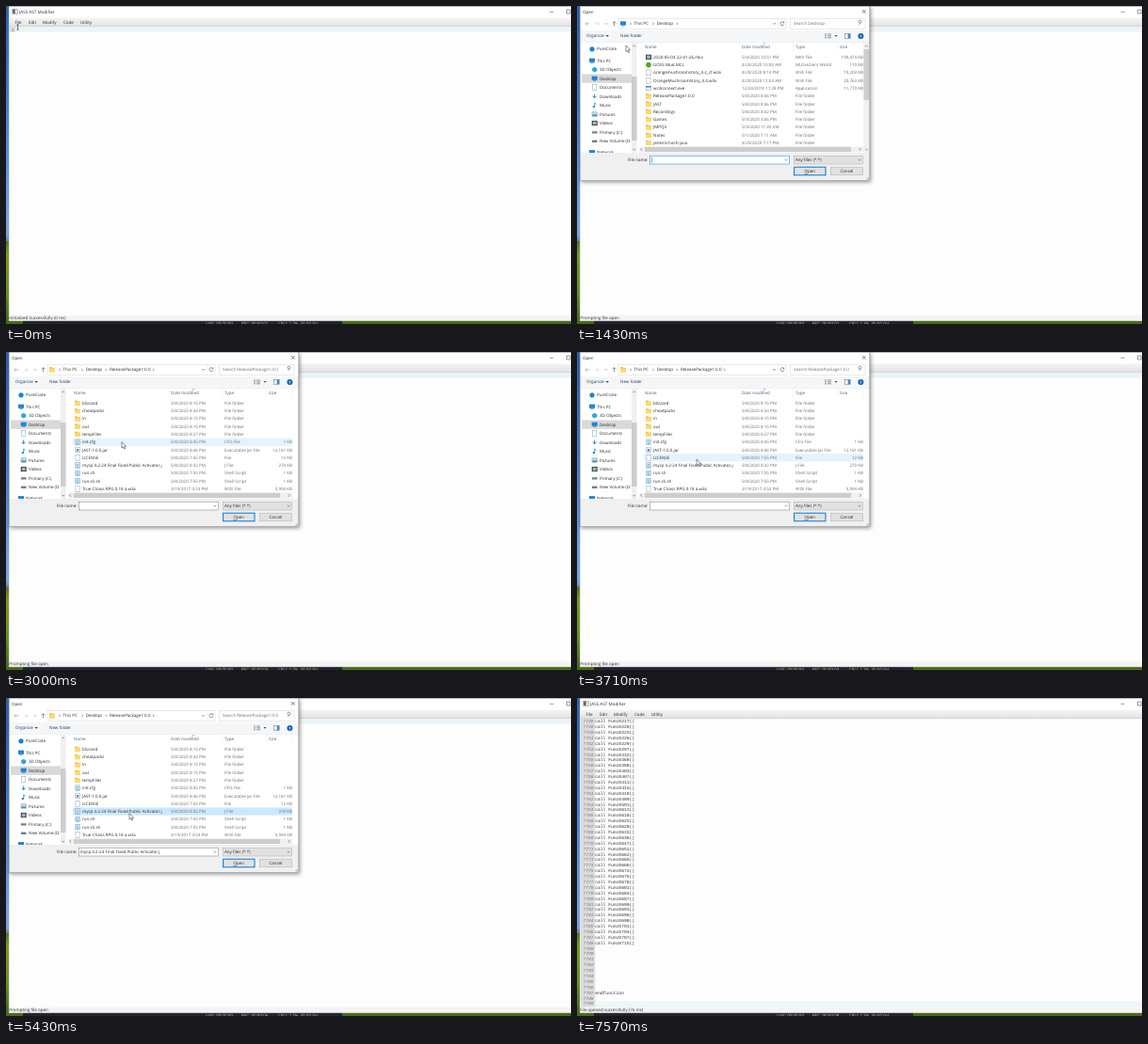
An HTML page that plays this animation: 600x338 px, repeating every 8 s.

```html
<!DOCTYPE html>
<html lang="en">
<head>
<meta charset="utf-8">
<title>JASS AST Modifier</title>
<style>
html, body { margin: 0; width: 100%; height: 100%; overflow: hidden; background: #fff; }
svg { display: block; width: 100vw; height: 100vh; }
text { font: 4.5px "Open Sans", "Noto Sans", sans-serif; fill: #2a2a2a; white-space: pre; text-rendering: geometricPrecision; }
.dim { fill: #6d6d6d; }
.head { fill: #4c607a; }
.tool { fill: #1e395b; }
.obs { fill: #c8c8c8; }
.end { text-anchor: middle; }
.right { text-anchor: end; }
.code { font: 4.67px "Liberation Mono", monospace; fill: #333; }
.num { font: italic 4.67px "Liberation Mono", monospace; fill: #777; }
</style>
</head>
<body>
<svg id="stage" viewBox="0 0 600 338" preserveAspectRatio="none"></svg>
<script>
const LOOP = 8000, STEP = 1000 / 7;
const DIALOG = 1000, FOLDER = 2570, PICK = 4570, CLOSE = 5860, LOADED = 6290;
const ROW0 = 54.3, ROW = 8.28;

const rect = (x, y, w, h, fill, more = '') =>
  `<rect x="${x}" y="${y}" width="${w}" height="${h}" fill="${fill}" ${more}/>`;
const box = (x, y, w, h, fill, line, id = '', width = .5) =>
  rect(x, y, w, h, fill, `stroke="${line}" stroke-width="${width}" ${id && `id="${id}"`}`);
const text = (x, mid, s, cls = '', id = '') =>
  `<text x="${x}" y="${mid + 1.6}" class="${cls}" ${id && `id="${id}"`}>${s}</text>`;
const line = (d, color = '#555', w = .6) =>
  `<path d="${d}" fill="none" stroke="${color}" stroke-width="${w}"/>`;
const fill = (d, color) => `<path d="${d}" fill="${color}"/>`;
const disc = (x, y, r, color) => `<circle cx="${x}" cy="${y}" r="${r}" fill="${color}"/>`;
const group = (id, s) => `<g id="${id}">${s}</g>`;
const chevron = (x, y, dx, dy, color) => dx
  ? line(`M${x - dx / 2} ${y - 1.3}l${dx} 1.3l${-dx} 1.3`, color)
  : line(`M${x - 1.4} ${y - dy / 2}l1.4 ${dy}l1.4 ${-dy}`, color);

// Icons, centred on x, y
const icons = {
  folder: (x, y) => fill(`M${x - 3} ${y - 2.7}h2.4l.7 .8h2.9v4.6h-6z`, '#f0c14b') +
    rect(x - 3, y - 1.2, 6, 3.7, '#ffd971'),
  page: (x, y) => box(x - 2.1, y - 2.9, 4.2, 5.8, '#fff', '#9a9a9a'),
  film: (x, y) => rect(x - 3, y - 2.6, 6, 5.2, '#3b4148') + rect(x - 1.9, y - 1.7, 3.8, 3.4, '#9fb4bd'),
  green: (x, y) => disc(x, y, 2.8, '#58a51f'),
  app: (x, y) => box(x - 2.8, y - 2.3, 5.6, 4.6, '#fff', '#7890a5') + rect(x - 2.8, y - 2.3, 5.6, 1.4, '#2d86d8'),
  note: (x, y) => box(x - 2.2, y - 2.8, 4.4, 5.6, '#d9edf7', '#6c9cb5') +
    line(`M${x - 1.4} ${y - 1}h2.8m-2.8 1.4h2.8m-2.8 1.4h2.8`, '#4c91bb', .5),
  jar: (x, y) => box(x - 2.2, y - 2.8, 4.4, 5.6, '#fff', '#8a9aa5') + rect(x - 1.3, y - 1, 2.6, 2.6, '#6b8fae'),
  screen: (x, y) => rect(x - 3, y - 2.4, 6, 4.2, '#1c86d6') + rect(x - 1.6, y + 2, 3.2, .7, '#4a7ca3'),
  cloud: (x, y) => disc(x, y, 2.6, '#1484d6'),
  cube: (x, y) => fill(`M${x} ${y - 2.7}l2.6 1.4v2.8l-2.6 1.4l-2.6 -1.4v-2.8z`, '#35a9c9'),
  down: (x, y) => line(`M${x} ${y - 2.5}v4m-2 -1.8l2 2l2 -2`, '#1c7fd0', 1),
  music: (x, y) => line(`M${x} ${y + 1.6}v-4l1.8 1.2`, '#1c7fd0', .8) + disc(x - .9, y + 1.7, 1.1, '#1c7fd0'),
  picture: (x, y) => box(x - 2.7, y - 2.2, 5.4, 4.4, '#b7def4', '#8396a5') + rect(x - 2.3, y + .4, 4.6, 1.5, '#4a8f86'),
  drive: (x, y) => rect(x - 2.8, y - .8, 5.6, 2.3, '#777f86') + rect(x - 2.2, y - 1.3, 4.4, .7, '#b9bec2')
};

const desktop = [
  ['film', '2020-05-04 22-41-26.mkv', '5/4/2020 10:51 PM', 'MKV File', '199,474 KB'],
  ['green', 'UOSS Mud.MCL', '4/20/2020 10:00 AM', 'MUSHclient World', '110 KB'],
  ['page', 'orangemushroomstory_4.2_cf.w3x', '4/20/2020 8:14 PM', 'W3X File', '19,203 KB'],
  ['page', 'OrangeMushroomStory_4.4.w3x', '4/20/2020 12:04 AM', 'W3X File', '20,763 KB'],
  ['app', 'wc3connect.exe', '12/24/2019 11:28 PM', 'Application', '11,770 KB'],
  ...[['ReleasePackage1.0.0', '5/8/2020 8:46 PM'], ['JAST', '5/8/2020 8:46 PM'],
    ['Recordings', '5/8/2020 8:42 PM'], ['Games', '5/3/2020 3:06 PM'], ['JMPQ3', '5/3/2020 11:35 AM'],
    ['Notes', '5/1/2020 7:11 AM'], ['jenkins-hash-java', '4/25/2020 7:17 PM']
  ].map(([name, date]) => ['folder', name, date, 'File folder', ''])
];
const picked = 'mycp 4.2-24 Final Fixed Public Activator.j';
const release = [
  ['folder', 'blizzard', '8:15', 'File folder', ''],
  ['folder', 'cheatpacks', '8:34', 'File folder', ''],
  ['folder', 'in', '8:15', 'File folder', ''],
  ['folder', 'out', '8:15', 'File folder', ''],
  ['folder', 'tempFiles', '8:27', 'File folder', ''],
  ['note', 'init.cfg', '8:45', 'CFG File', '1 KB'],
  ['jar', 'JAST-1.0.0.jar', '8:46', 'Executable Jar File', '12,161 KB'],
  ['page', 'LICENSE', '7:55', 'File', '12 KB'],
  ['note', picked, '8:32', 'J File', '270 KB'],
  ['note', 'run.sh', '7:55', 'Shell Script', '1 KB'],
  ['note', 'run-cli.sh', '7:55', 'Shell Script', '1 KB']
].map(([icon, name, time, ...rest]) => [icon, name, `5/8/2020 ${time} PM`, ...rest]);
release.push(['page', 'True Chaos RPG 0.18 a.w3x', '3/19/2017 3:53 PM', 'W3X File', '5,994 KB']);

const fileRows = list => list.map(([icon, name, date, type, size], i) => {
  const y = ROW0 + i * ROW;
  return icons[icon](76, y) + text(81, y, name) + text(175, y, date, 'dim') +
    text(232, y, type, 'dim') + text(304, y, size, 'dim right');
}).join('');

function backdrop() {
  return rect(0, 0, 600, 338, 'url(#sky)') + rect(0, 334, 600, 4, '#4a6a1b') +
    rect(0, 250, 3, 88, 'url(#grass)') + rect(18, 334, 339, 4, '#23262c') +
    text(212, 337.6, 'LIVE: 00:00:00', 'obs') + text(250, 337.6, '', 'obs', 'rec') +
    text(289, 337.6, 'CPU: 2.2%, 30.00 fps', 'obs');
}

function mainWindow() {
  const menus = [[9.5, 'File'], [24, 'Edit'], [39, 'Modify'], [61, 'Code'], [79, 'Utility']];
  return rect(3, 0, 597, 334.5, '#fdfdfe') + rect(3, 0, 597, 12.5, '#fff') +
    rect(3, 0, 597, .6, '#8a8f98') + rect(2.8, 0, .4, 334.5, '#7c8794') +
    box(6.8, 3.2, 5.4, 5.2, '#e4e7ea', '#777') + rect(7.3, 3.7, 2.2, 4.2, '#555') +
    `<text x="14" y="7.9" style="font-size:4.6px">JASS AST Modifier</text>` +
    line('M577.5 6.3h4') + line('M595.5 4h3.6v4h-3.6z') +
    rect(3, 12.5, 597, 9.5, 'url(#bar)') + rect(3, 21.6, 597, .5, '#c4c4c4') +
    menus.map(([x, s]) => text(x, 17.1, s)).join('') +
    group('blank', rect(3, 22, 597, 5.7, '#edf4f7') + rect(3, 22, 7, 5.7, '#ddd') + text(6, 25, '1', 'num')) +
    group('code', codePage()) +
    rect(3, 328.6, 597, 5.9, '#f4f4f4') + text(3.3, 331.4, '', '', 'status');
}

function codePage() {
  const calls = ('217 220 223 226 229 297 332 368 388 403 407 411 415 419 489 591 613 618 623 628 633 ' +
    '636 647 651 662 665 668 672 675 678 681 684 687 690 693 696 698 701 704 707 715').split(' ');
  let s = rect(3, 322, 597, 6.6, '#edf6f8') + rect(4, 22, 15.2, 306.6, '#dcdcdc');
  for (let i = 0; i < 52; i++) {
    const y = 24.6 + i * 5.888;
    const body = calls[i] ? `call Func0${calls[i]}()` : i === 49 ? 'endfunction' : '';
    s += text(6.4, y, 7748 + i, 'num') + text(19.2, y, body, 'code');
  }
  return s;
}

function sidebar() {
  const items = [['cloud', 'PureCrate'], ['screen', 'This PC'], ['cube', '3D Objects'], ['screen', 'Desktop'],
    ['page', 'Documents'], ['down', 'Downloads'], ['music', 'Music'], ['picture', 'Pictures'],
    ['film', 'Videos'], ['drive', 'Primary (C:)'], ['drive', 'New Volume (D:'], ['screen', 'Network']];
  const rows = items.map(([icon, name], i) => {
    const y = i ? 58 + (i - 1) * 9.5 + (i > 10 ? 2.5 : 0) : 45.8;
    const top = i < 2 || i > 10;
    return icons[icon](top ? 16 : 18.7, y) + text(top ? 21 : 24, y, name);
  }).join('');
  return `<g clip-path="url(#side)">${rect(5, 72.4, 53, 9.4, '#d9d9d9')}${rows}</g>` +
    rect(58, 39, 5.5, 117, '#f0f0f0') + rect(58, 75, 5.5, 68, '#cdcdcd') +
    chevron(60.7, 42.5, 0, -1.4) + chevron(60.7, 152.5, 0, 1.4);
}

function dialog() {
  const head = rect(3, 0, 308, 185.5, '#fff', 'filter="url(#shade)"') + text(6, 6.3, 'Open') +
    line('M303 4l3.6 3.8m0 -3.8l-3.6 3.8', '#333') +
    line('M13.5 18.8h-4.5m2 -2l-2 2l2 2', '#999') + line('M18.8 18.8h4.5m-2 -2l2 2l-2 2', '#ccc') +
    chevron(31, 18.8, 0, 1.3, '#888') + line('M39.5 21.3v-4.7m-2 2l2 -2l2 2') +
    box(44, 13.5, 178, 10.8, '#fff', '#d4d4d4') + line('M213.7 13.5v10.8', '#ddd', .4) +
    chevron(209.5, 18.8, 0, 1.3) + line('M219.6 17.5a2 2 0 1 0 .3 1.8m-.1 -2.9v1.5h-1.5') +
    box(226.5, 13.5, 79.5, 10.8, '#fff', '#d4d4d4') + line('M301.6 17.6a1.5 1.5 0 1 0 -.1 .1l-2 2.2') +
    chevron(57, 18.8, 1.2, 0) + text(60.5, 18.8, 'This PC') + chevron(81, 18.8, 1.2, 0) +
    text(84.7, 18.8, 'Desktop') + chevron(106.3, 18.8, 1.2, 0);
  const tools = rect(3.3, 26, 307.4, 12.5, '#f5f6f7') + rect(3.3, 38.3, 307.4, .4, '#dfe1e3') +
    text(10, 31.8, 'Organize', 'tool') + fill('M30.5 31h3.4l-1.7 1.8z', '#1e395b') +
    text(46, 31.8, 'New folder', 'tool') +
    line('M263 30h2m1 0h4m-7 1.9h2m1 0h4m-7 1.9h2m1 0h4', '#667788', .8) + fill('M273.5 31h3l-1.5 1.7z', '#444') +
    box(284.3, 29.4, 5.8, 4.8, '#fff', '#456a8c') + rect(287.7, 29.4, 2.4, 4.8, '#4089c9') +
    disc(301.4, 31.9, 3, '#0b63b5') +
    `<text x="301.4" y="33.6" class="end" style="fill:#fff;font-weight:700">?</text>`;
  const columns = [[72, 'Name'], [175, 'Date modified'], [232, 'Type'], [279, 'Size']]
    .map(([x, s]) => text(x, 43.2, s, 'head')).join('') +
    [173, 229.5, 276.5, 304.3].map(x => line(`M${x} 39v9`, '#e2e2e2', .4)).join('') +
    chevron(199, 39.8, 0, -1.1, '#888');
  const bars = rect(66, 149.5, 238.3, 6, '#f0f0f0') + rect(72, 149.8, 219, 5.2, '#cdcdcd') +
    line('M69 151l-1.3 1.4l1.3 1.4') + line('M300 151l1.3 1.4l-1.3 1.4');
  const foot = rect(3.3, 156, 307.4, 29.2, '#f0f0f0') + text(54, 163.5, 'File name:') +
    box(77.3, 159.2, 148.4, 8.8, '#fff', '#7a7a7a', 'field') + chevron(222, 163.6, 0, 1.3) +
    rect(79, 160.8, .4, 5.5, '#000', 'id="caret"') + text(78.8, 163.5, picked, '', 'chosen') +
    box(230.3, 159.2, 73.4, 8.8, '#e1e1e1', '#adadad') + text(232, 163.5, 'Any files (*.*)') +
    chevron(300, 163.6, 0, 1.3) +
    box(230.6, 171.2, 33.4, 8.6, '#e1e1e1', '#0078d7', '', 1) +
    text(247.3, 175.4, '<tspan text-decoration="underline">O</tspan>pen', 'end') +
    box(269.4, 171.2, 34.2, 8.6, '#e1e1e1', '#adadad') + text(286.5, 175.4, 'Cancel', 'end') +
    fill('M309.8 181.5v3h-3z', '#bbb');
  const listA = icons.screen(49, 18.7) + text(230, 18.8, 'Search Desktop', 'dim') + fileRows(desktop) +
    rect(304.5, 39, 5.8, 117, '#f0f0f0') + rect(304.5, 46, 5.8, 54, '#cdcdcd') +
    chevron(307.4, 42.5, 0, -1.4) + chevron(307.4, 152.5, 0, 1.4);
  const listB = icons.folder(49, 18.7) + text(110, 18.8, 'ReleasePackage1.0.0') + chevron(156.5, 18.8, 1.2, 0) +
    text(230, 18.8, 'Search ReleasePackage1.0.0', 'dim') + fileRows(release);
  const tip = box(107, 97, 75, 11.6, '#fff', '#888') +
    text(108.7, 100.5, 'Date created: 12/24/2019 11:28 PM', 'dim') + text(108.7, 105.4, 'Size: 11.4 MB', 'dim');
  return head + tools + sidebar() + columns + rect(71, 0, 233, ROW, '#e5f3ff', 'id="hover"') +
    group('listA', listA) + group('listB', listB) + bars + foot +
    `<g id="tip" opacity=".88">${tip}</g>` +
    rect(3.2, .2, 307.6, 185.2, 'none', 'stroke="#777" stroke-width=".5"');
}

const stage = document.getElementById('stage');
const fade = (id, ...stops) => `<linearGradient id="${id}" x2="0" y2="1">${
  stops.map(([at, c]) => `<stop offset="${at}" stop-color="${c}"/>`).join('')}</linearGradient>`;
stage.innerHTML = `<defs>
  ${fade('sky', [0, '#2e62b5'], [.3, '#4080dc'], [.6, '#6a9fea'], [.72, '#7ba6e6'], [.74, '#71809a'])}
  ${fade('grass', [0, '#55741f'], [.15, '#7d9c12'], [.6, '#6f9216'], [1, '#45661a'])}
  ${fade('bar', [0, '#f5f5f5'], [1, '#e1e1e1'])}
  <clipPath id="side"><rect x="3" y="39" width="55" height="117"/></clipPath>
  <filter id="shade" x="-5%" y="-5%" width="112%" height="112%">
    <feDropShadow dx="1" dy="1.5" stdDeviation="2" flood-opacity=".45"/></filter></defs>` +
  backdrop() + mainWindow() + group('dialog', dialog()) +
  group('arrow', '<path d="M0 0v6.6l1.5-1.4l1.1 2.5l1.1-.5l-1.1-2.4h2z" fill="#fff" stroke="#222" stroke-width=".5"/>') +
  group('beam', line('M-1.2 -2.6h2.4M0 -2.6v5.2M-1.2 2.6h2.4', '#222', .6));

const $ = {};
stage.querySelectorAll('[id]').forEach(el => $[el.id] = el);
const show = (el, on) => el.style.display = on ? '' : 'none';

// Pointer path: time, x, y
const path = [[0, 12.5, 22.5], [140, 12.5, 22.5], [290, 13, 18], [570, 13, 18], [860, 18, 27], [1140, 28, 32],
  [1430, 52, 42], [1570, 92, 78], [1710, 104, 87], [1855, 105, 89], [2000, 111.5, 110.5], [2290, 110, 97],
  [2570, 110, 96], [3000, 123, 95.5], [3714, 127, 114], [3860, 128, 115.5], [4000, 129, 118],
  [5000, 130, 121], [5430, 131, 122.5], [5860, 131, 122.5], [6860, 180, 185], [7570, 230, 350]];

function pointer(t) {
  const i = path.findIndex(p => p[0] > t);
  if (i < 0) return path[path.length - 1].slice(1);
  const [a, b] = [path[i - 1], path[i]];
  const k = (t - a[0]) / (b[0] - a[0]);
  return [1, 2].map(n => a[n] + (b[n] - a[n]) * k);
}

function draw(now) {
  const t = Math.floor((now + 5) / STEP) * STEP + 1;
  const [x, y] = pointer(t);
  const open = t >= DIALOG && t < CLOSE, inside = t >= FOLDER, loaded = t >= LOADED;
  const chosen = t >= PICK;

  show($.dialog, open);
  show($.listA, !inside);
  show($.listB, inside);
  show($.blank, !loaded);
  show($.code, loaded);
  $.status.textContent = loaded ? 'File opened successfully (76 ms)'
    : t >= DIALOG ? 'Prompting file open' : 'Initialized Successfully (0 ms)';
  $.rec.textContent = `REC: 00:00:0${1 + Math.floor(t / 1000)}`;

  const row = chosen ? 8 : Math.floor((y - ROW0) / ROW + .5);
  show($.hover, x > 71 && row >= 0 && row < 12);
  $.hover.setAttribute('y', ROW0 + (row - .5) * ROW);
  $.hover.setAttribute('fill', chosen ? '#cce8ff' : '#e5f3ff');
  $.field.setAttribute('stroke', inside ? '#7a7a7a' : '#0078d7');
  show($.caret, !inside);
  show($.chosen, chosen);
  show($.tip, t >= 1855 && t < 2140);

  const typing = t < 285 || t >= CLOSE;
  show($.arrow, !typing);
  show($.beam, typing);
  (typing ? $.beam : $.arrow).setAttribute('transform', `translate(${x} ${y})`);
}

const start = performance.now();
function tick() {
  draw((performance.now() - start) % LOOP);
  requestAnimationFrame(tick);
}
tick();
</script>
</body>
</html>
```
